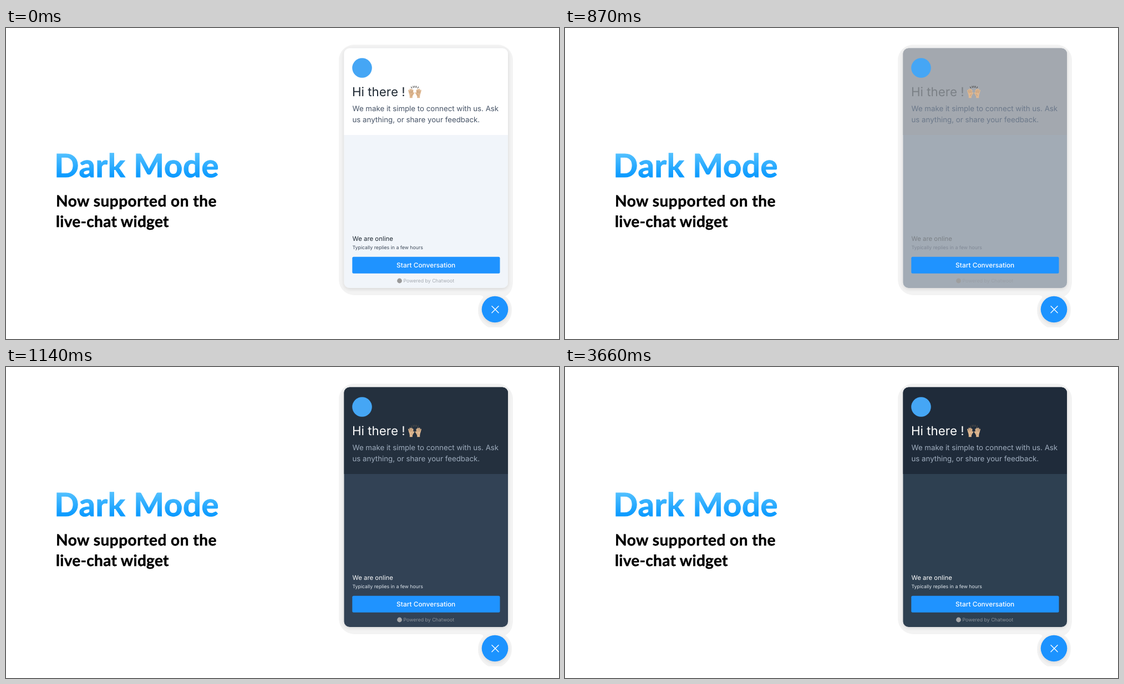
An HTML page for the animation above (4230 ms loop, 997 px wide and 561 px high).

```html
<!DOCTYPE html>
<html lang="en">
<head>
<meta charset="utf-8">
<title>Dark Mode</title>
<style>
  html, body { margin: 0; width: 100%; height: 100%; overflow: hidden; background: #fff; }
  svg { display: block; width: 100%; height: 100%; text-rendering: geometricPrecision; }
  .lead { font: 700 28px Lato, sans-serif; letter-spacing: .5px; stroke: #000; stroke-width: .45; }
  .title { font-size: 58px; letter-spacing: .7px; fill: url(#sky); stroke: url(#sky); stroke-width: 1.1; }
  .tight { letter-spacing: .3px; }
  .panel { font-family: Inter, sans-serif; }
  .medium { font-weight: 500; }
  .hand { fill: none; stroke: #dfb891; stroke-linecap: round; stroke-linejoin: round; }
</style>
</head>
<body>
<svg viewBox="0 0 997 561">
  <defs>
    <linearGradient id="sky" gradientUnits="userSpaceOnUse" x1="0" y1="227" x2="0" y2="270">
      <stop stop-color="#51c0ff"/>
      <stop offset="1" stop-color="#0798ff"/>
    </linearGradient>
    <filter id="soft" x="-20%" y="-20%" width="140%" height="140%">
      <feDropShadow dx="0" dy="2" stdDeviation="3" flood-opacity=".12"/>
    </filter>
    <g id="hand" class="hand">
      <path stroke-width="2.1" d="M727.6 118L726.2 112.5M729.6 117L728.6 110.5M731.6 117L731.3 110.6M733 118L733.4 112.4M733 120.5L735.4 117"/>
      <path stroke-width="6" d="M730 118.4L730.6 121"/>
      <path stroke-width="5" stroke-linecap="butt" d="M730.3 120L730.3 126.2"/>
      <path stroke="#a97f5c" stroke-width=".5" d="M728.6 117L727.5 113M730.6 116.5L730 112M732.4 117L732.5 113M733 119Q730.6 120 730.8 122.5"/>
    </g>
  </defs>

  <g class="lead">
    <text class="title" x="87.3" y="269">Dark Mode</text>
    <text x="90" y="322">Now supported on the</text>
    <text class="tight" x="90" y="359">live-chat widget</text>
  </g>

  <path fill="#f3f3f3" d="M628 30H886a28 28 0 0 1 28 28V456C914 472 908 480 900 484C908 490 912 498 912 509C912 522 905 533 893 540H870C858 534 851 522 851 510C851 498 856 490 860 487C862 484 858 482 852 482H628a28 28 0 0 1-28-28V58a28 28 0 0 1 28-28z"/>

  <g class="panel">
    <rect x="609.5" y="36.5" width="295.5" height="432.5" rx="10" filter="url(#soft)" data-mix="f1f5fa 2f3f51"/>
    <path d="M609.5 193V46.5a10 10 0 0 1 10-10H895a10 10 0 0 1 10 10V193z" data-mix="ffffff 1f2b3a"/>
    <circle cx="642" cy="72" r="17.8" fill="#45a6f5"/>

    <text x="624" y="123.3" font-size="22.35" data-mix="1f2933 ffffff">Hi there !</text>
    <use href="#hand"/>
    <use href="#hand" transform="matrix(-1 0 0 1 1474 0)"/>
    <path fill="none" stroke-width="1.1" stroke-linecap="round" data-stroke="3a3a3a 56504a"
      d="M730.4 106.3L731.8 108.3M734 104.8L734.6 107.4M737 104.5V107M740 104.8L739.4 107.4M743.6 106.3L742.2 108.3"/>

    <g font-size="13.28" data-mix="465366 a0aebf">
      <text x="624.5" y="150">We make it simple to connect with us. Ask</text>
      <text x="624.5" y="169.8">us anything, or share your feedback.</text>
    </g>

    <text x="624.5" y="383.6" font-size="11.4" data-mix="1f2933 ffffff">We are online</text>
    <text x="624.5" y="398.7" font-size="8.75" data-mix="3c4858 e2e8ef">Typically replies in a few hours</text>

    <rect x="624.3" y="412.8" width="266.2" height="30" rx="2.5" fill="#1f93ff"/>
    <text class="medium" x="757.2" y="432.3" font-size="11.9" text-anchor="middle" fill="#fff">Start Conversation</text>

    <circle cx="709.5" cy="456" r="4.4" data-mix="9a9a9a a2a4a7"/>
    <text x="716.5" y="459.2" font-size="8.8" data-mix="a5aab1 8b929b">Powered by Chatwoot</text>
  </g>

  <circle cx="881.5" cy="507.5" r="23.8" fill="#1f93ff" filter="url(#soft)"/>
  <path stroke="#fff" stroke-width="1.4" stroke-linecap="round" d="M876 501.7L888 513.7M888 501.7L876 513.7"/>
</svg>
<script>
const LOOP = 4230, START = 750, FADE = 480, STEP = 30;

const parse = hex => [0, 2, 4].map(i => parseInt(hex.substr(i, 2), 16));
const fades = [...document.querySelectorAll('[data-mix], [data-stroke]')].map(el => ({
  el,
  attr: el.dataset.mix ? 'fill' : 'stroke',
  ends: (el.dataset.mix || el.dataset.stroke).split(' ').map(parse)
}));

// cubic-bezier(.25, .1, .25, 1)
const bezier = (a, b, u) => 3 * a * u * (1 - u) ** 2 + 3 * b * u * u * (1 - u) + u ** 3;
function ease(x) {
  if (x <= 0) return 0;
  if (x >= 1) return 1;
  let lo = 0, hi = 1;
  for (let i = 0; i < 20; i++) {
    const mid = (lo + hi) / 2;
    if (bezier(.25, .25, mid) < x) lo = mid; else hi = mid;
  }
  return bezier(.1, 1, lo);
}

function draw() {
  const t = Math.floor(performance.now() % LOOP / STEP) * STEP;
  const p = ease((t - START) / FADE);
  for (const { el, attr, ends: [light, dark] } of fades) {
    const rgb = light.map((c, i) => Math.round(c + (dark[i] - c) * p));
    el.setAttribute(attr, `rgb(${rgb})`);
  }
  requestAnimationFrame(draw);
}
draw();
</script>
</body>
</html>
```
